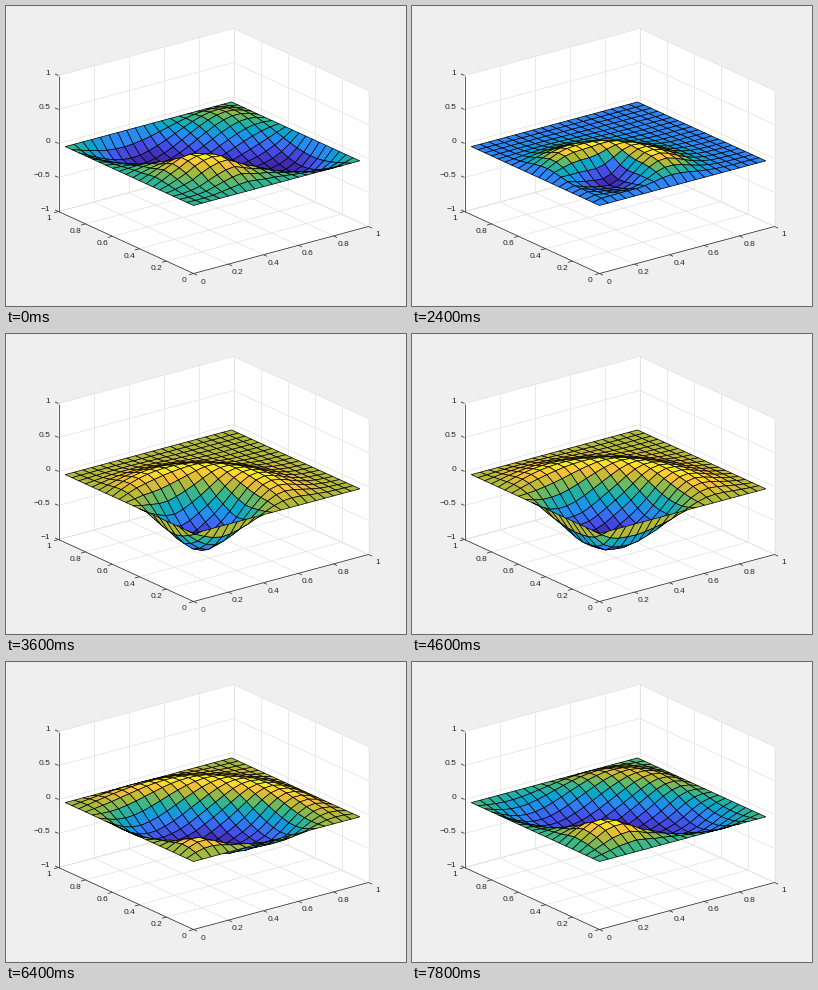
A matplotlib script that plays this animation: 400 px wide and 300 px high, repeating every 8000 ms.

```python
import matplotlib.pyplot as plt
import numpy as np
from matplotlib.animation import FuncAnimation
from matplotlib.collections import LineCollection, PolyCollection
from matplotlib.colors import LinearSegmentedColormap

W, H, DPI = 400, 300, 100
PX = 72 / DPI
FRAMES, INTERVAL = 40, 200

# wave solver: square grid, fixed edges, starting from a smooth bump
N, DX = 20, 0.05
DT = DX / 3
CENTRE, WIDTH = 0.25, 0.18
LAST_STEP = 44

CMAP = LinearSegmentedColormap.from_list("blue_to_yellow", [
    "#3e26a8", "#4550ec", "#2c86f7", "#08a6d0",
    "#35b78c", "#a9b93a", "#fcc037", "#f9f525"])
INK = "#262626"
TICKS = np.linspace(0, 1, 6)
Z_TICKS = np.linspace(-1, 1, 5)


def project(x, y, z):
    """Orthographic view of the unit box, in stage pixels."""
    return np.stack([187 + 175 * x - 135 * y,
                     199 - 47 * x - 62 * y - 68 * z], axis=-1)


def seg(a, b):
    return [project(*a), project(*b)]


def laplacian(u):
    """Five-point sum, zero on the edges so that they stay fixed."""
    out = np.zeros_like(u)
    out[1:-1, 1:-1] = (u[2:, 1:-1] + u[:-2, 1:-1] + u[1:-1, 2:]
                       + u[1:-1, :-2] - 4 * u[1:-1, 1:-1])
    return out


def solve():
    bump = np.exp(-((np.arange(N) * DX - CENTRE) / WIDTH) ** 2)
    bump[[0, -1]] = 0
    start = np.outer(bump, bump)
    r2 = (DT / DX) ** 2
    states = [start, start + r2 / 2 * laplacian(start)]
    while len(states) <= LAST_STEP:
        old, now = states[-2:]
        states.append(2 * now - old + r2 * laplacian(now))
    return states


def draw_box(ax):
    steps = ((0, 0), (1, 0), (1, 1), (0, 1))
    walls = [[project(a, b, -1) for a, b in steps],
             [project(a, 1, 2 * b - 1) for a, b in steps],
             [project(1, a, 2 * b - 1) for a, b in steps]]
    ax.add_collection(PolyCollection(walls, facecolors="white",
                                     edgecolors="none", zorder=0))

    k = 0.026
    grid = []
    lines = [seg((0, 1, -1), (0, 1, 1)), seg((0, 1, -1), (0, 0, -1)),
             seg((0, 0, -1), (1, 0, -1))]
    for t in TICKS:
        grid += [seg((t, 0, -1), (t, 1, -1)), seg((t, 1, -1), (t, 1, 1)),
                 seg((0, t, -1), (1, t, -1)), seg((1, t, -1), (1, t, 1))]
        lines += [seg((t, 0, -1), (t, -k, -1)), seg((0, t, -1), (-k, t, -1))]
    for z in Z_TICKS:
        grid += [seg((0, 1, z), (1, 1, z)), seg((1, 0, z), (1, 1, z))]
        lines.append(seg((0, 1, z), (0, 1 + k, z)))
    ax.add_collection(LineCollection(
        grid, colors="#e1e1e1", linewidths=0.7 * PX, zorder=1))
    ax.add_collection(LineCollection(
        lines, colors=INK, linewidths=0.7 * PX, zorder=2))


def draw_labels(ax):
    def label(point, dx, dy, value, ha="center"):
        text = f"{value:.1g}".replace("-", "\u2212")
        ax.text(point[0] + dx, point[1] + dy, text, ha=ha,
                va="center_baseline", color=INK, family="Liberation Sans",
                fontsize=8.4 * PX, zorder=5)

    for t in TICKS:
        label(project(t, 0, -1), 9.5, 7.5, t)
        label(project(0, t, -1), -10, 6.5, t)
    for z in Z_TICKS:
        label(project(0, 1, z), -8, -3, z, "right")


states = solve()
gx, gy = np.meshgrid(np.arange(N) * DX, np.arange(N) * DX, indexing="ij")
# cells from the far corner to the near one
cells = sorted(np.ndindex(N - 1, N - 1), key=sum, reverse=True)
ci, cj = np.array(cells).T

fig = plt.figure(figsize=(W / DPI, H / DPI), dpi=DPI, facecolor="#efefef")
ax = fig.add_axes([0, 0, 1, 1])
ax.set_xlim(-0.5, W - 0.5)
ax.set_ylim(H - 0.5, -0.5)
ax.axis("off")
draw_box(ax)
draw_labels(ax)
surface = PolyCollection([], edgecolors="black", linewidths=0.7 * PX,
                         joinstyle="round", zorder=3)
ax.add_collection(surface)


def update(n):
    # the first frame closes the previous run, the next one starts afresh
    u = states[n - 1 if n else LAST_STEP]
    p = project(gx, gy, u)
    quads = np.stack([p[ci, cj], p[ci + 1, cj],
                      p[ci + 1, cj + 1], p[ci, cj + 1]], axis=1)
    level = (u - u.min()) / (u.max() - u.min())
    surface.set_verts(quads)
    surface.set_facecolor(CMAP(level[ci, cj]))
    return (surface,)


anim = FuncAnimation(fig, update, frames=FRAMES, interval=INTERVAL,
                     init_func=lambda: update(0), repeat=True,
                     repeat_delay=0, blit=False)
plt.show()
```
